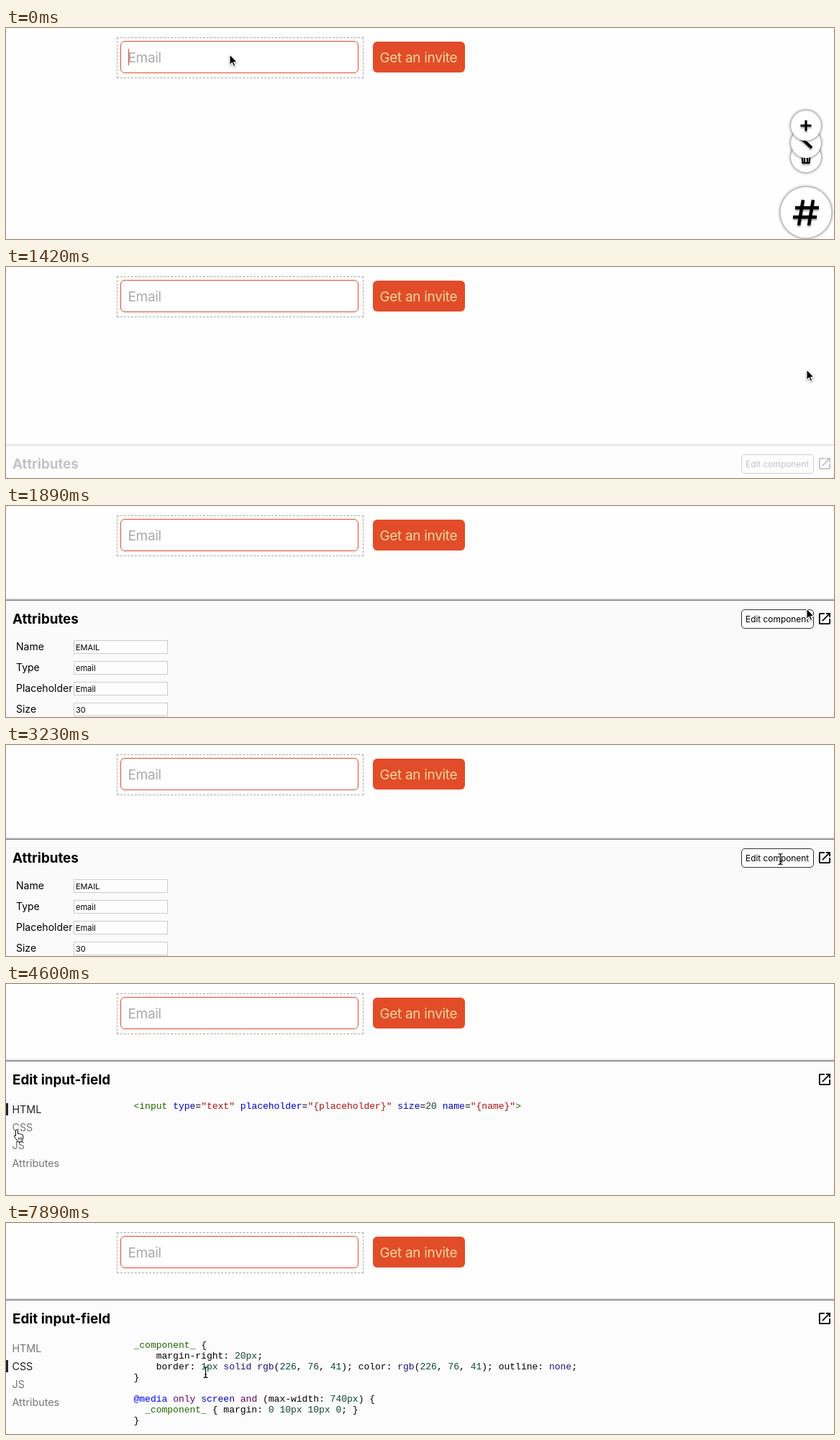
An HTML page that plays this animation: 1151 by 294 pixels, repeating every 8000 ms.

```html
<!DOCTYPE html>
<html lang="en">
<head>
<meta charset="utf-8">
<title>Component editor</title>
<style>
  html, body { margin: 0; width: 100%; height: 100%; overflow: hidden; background: #fefefe; }
  svg { display: block; }
  text { font-family: Inter, sans-serif; white-space: pre; }
  .frame { position: absolute; left: 154px; top: 13px; width: 341px; height: 55px; border: 1px dashed #aaa; }
  .big { font-size: 19px; letter-spacing: -.33px; }
  .title { font-size: 18.8px; font-weight: 700; }
  .label { font-size: 14px; }
  .value { font-size: 11px; }
  .tab { font-size: 14.3px; fill: #777; }
  .tab.on { fill: #222; }
  .code text { font: 13px "Liberation Mono", monospace; }
  .tag { fill: #260; } .attr { fill: #00c; } .str { fill: #a11; } .num { fill: #143; }
  .atom { fill: #217; } .def { fill: #00f; } .key { fill: #606; }
  .sheet { filter: drop-shadow(0 -1px 1.5px #000c); }
  .disc { fill: #fff; filter: drop-shadow(0 0 2px #444); }
  .icon { fill: none; stroke: #000; filter: drop-shadow(0 2px 1px #0006); }
</style>
</head>
<body>
<div class="frame"></div>
<svg width="1151" height="294" style="position:relative">
  <defs>
    <path id="open" transform="translate(1127.3 15.3) scale(.89)" d="M19 19H5V5h7V3H5c-1.1 0-2 .9-2 2v14c0 1.1.9 2 2 2h14c1.1 0 2-.9 2-2v-7h-2zM14 3v2h3.6l-9.8 9.8 1.4 1.4L19 6.4V10h2V3z"/>
  </defs>

  <rect x="159.5" y="18.5" width="330" height="44" rx="5.5" fill="#fff" stroke="#e24c29"/>
  <text class="big" x="169.500" y="48" fill="#aaa">Email</text>
  <path id="caret" d="M170.5 29v23" stroke="#e24c29"/>
  <rect x="510" y="19" width="128" height="43" rx="6" fill="#e24c29"/>
  <text class="big" x="519.5" y="48" fill="#f5d79c">Get an invite</text>

  <g id="menu">
    <g class="fab"><circle class="disc" r="21"/>
      <path class="icon" stroke-width="2" d="M-7-4H7M-3-6H3M-5.5-2L-4.5 8H4.5L5.5-2M-2-2V8M2-2V8"/></g>
    <g class="fab"><circle class="disc" r="21"/>
      <path class="icon" stroke-width="4" d="M-7-7L8 7"/></g>
    <g class="fab"><circle class="disc" r="21"/>
      <path class="icon" stroke-width="3" d="M-7.5 0H7.5M0-7.5V7.5"/></g>
    <g transform="translate(1112 257)"><circle class="disc" r="35.5"/>
      <path class="icon" stroke-width="4.5" d="M-15-6.500H18M-18 6.500H15M-4-17.500L-10 18M10-17.500L4 18"/></g>
  </g>

  <g id="attributes">
    <rect class="sheet" x="-10" y="1" width="1171" height="320" fill="#fafafa"/>
    <text class="title" x="9" y="33">Attributes</text>
    <rect x="1022.5" y="13.5" width="100" height="26" rx="4.5" fill="#fdfdfd" stroke="#333"/>
    <text x="1028" y="31" font-size="11.9">Edit component</text>
    <use href="#open"/>
    <g id="rows"></g>
  </g>

  <g id="editor" transform="translate(0 107)">
    <rect class="sheet" x="-10" y="1" width="1171" height="220" fill="#fcfcfc"/>
    <text class="title" x="9" y="33">Edit input-field</text>
    <use href="#open"/>
    <rect id="marker" width="3" height="17" fill="#222"/>
    <g id="tabs"></g>
    <g class="code" id="html"></g>
    <g class="code" id="css"></g>
  </g>

  <g id="cursor" stroke-linejoin="round">
    <path id="arrow" transform="scale(.88)" d="M0 0V16.500L3.800 13 6.300 18.800 9 17.600 6.500 12H11.700Z" stroke="#fff" stroke-width="1.2" style="filter:drop-shadow(0 1px 1px #0006)"/>
    <g id="beam" fill="none">
      <path stroke="#fff" stroke-width="2.5" d="M0-6V6"/>
      <path stroke="#000" stroke-width="1.2" d="M-3-7.500Q0-7.500 0-5.500V5.500Q0 7.500-3 7.500M3-7.500Q0-7.500 0-5.500V5.500Q0 7.500 3 7.500M-1.500 3H1.500"/>
    </g>
    <g id="hand" transform="translate(-4.500 0)" fill="#fff" stroke="#000">
      <path d="M3 9V2a1.500 1.500 0 0 1 3 0V6q2-1 2.800.6 2-.6 2.400.8 2-.3 2 1.600v3q0 2-1.500 3.500v2H5.500V16Q3 13 1 10q-1-2 2-1Z"/>
      <path d="M6.800 11v3.500M9 11v3.500M11 11v3.500" stroke-width=".8"/>
    </g>
  </g>
</svg>
<script>
const $ = id => document.getElementById(id);
const show = (id, on) => $(id).style.display = on ? '' : 'none';
const place = (el, x, y) => el.setAttribute('transform', `translate(${x} ${y})`);
const clamp = v => Math.max(0, Math.min(1, v));
const ease = p => p * p * (3 - 2 * p);

const rows = [['Name', 'EMAIL'], ['Type', 'email'], ['Placeholder', 'Email'], ['Size', '30']];
$('rows').innerHTML = rows.map(([label, value], i) => `<g transform="translate(0 ${29 * i})">
  <text class="label" x="14" y="70">${label}</text>
  <rect x="94.5" y="56.5" width="130" height="18" fill="#fdfdfd" stroke="#ccc"/>
  <text class="value" x="97" y="70">${value}</text></g>`).join('');

$('tabs').innerHTML = ['HTML', 'CSS', 'JS', 'Attributes']
  .map((name, i) => `<text class="tab" x="8.500" y="${73 + 25 * i}">${name}</text>`).join('');

// Code lines mark coloured words as [class|word].
const paint = line => line.replace(/</g, '&lt;').replace(/>/g, '&gt;')
  .replace(/\[(\w+)\|(.*?)\]/g, '<tspan class="$1">$2</tspan>');
const writeCode = (id, lines) => $(id).innerHTML = lines
  .map((line, i) => `<text x="177.500" y="${67 + 15 * i}">${paint(line)}</text>`).join('');

writeCode('html', [
  '[tag|<input] [attr|type]=[str|"text"] [attr|placeholder]=[str|"{placeholder}"] [attr|size]=[num|20] [attr|name]=[str|"{name}"][tag|>]'
]);
const rgb = '[atom|rgb]([num|226], [num|76], [num|41])';
writeCode('css', [
  '[tag|_component_] {',
  '    margin-right: [num|20px];',
  `    border: [num|1px] [atom|solid] ${rgb}; color: ${rgb}; outline: [atom|none];`,
  '}',
  '',
  '[def|@media] [key|only] [attr|screen] [key|and] (max-width: [num|740px]) {',
  '  [tag|_component_] { margin: [num|0] [num|10px] [num|10px] [num|0]; }',
  '}'
]);

// Pointer moves: start, end, then four Bezier points.
const moves = [
  [60, 200, [311, 37], [313, 32], [318, 33], [320, 35]],
  [380, 950, [320, 35], [700, 60], [1130, 260], [1113, 143]],
  [2400, 2600, [1113, 143], [1105, 146], [1085, 157], [1076.5, 159]],
  [3890, 4370, [1076.5, 159], [800, 175], [300, 315], [5, 206]],
  [4540, 4600, [5, 206], [8, 205], [12, 203], [15, 202.5]],
  [5650, 5710, [15, 202.5], [20, 200], [25, 198], [30, 196]],
  [7000, 7800, [30, 196], [200, 215], [600, 280], [284, 206]],
  [7830, 7890, [284, 206], [282, 207], [280, 208], [277.5, 208]]
];

function pointer(t) {
  const [start, end, ...pts] = moves.filter(m => m[0] <= t).pop() || moves[0];
  const u = ease(clamp((t - start) / (end - start))), v = 1 - u;
  const w = [v * v * v, 3 * v * v * u, 3 * v * u * u, u * u * u];
  return [0, 1].map(axis => pts.reduce((sum, p, i) => sum + p[axis] * w[i], 0));
}

function pointerKind(t, x) {
  if (t < 2560) return 'arrow';
  if (t < 3890 || x > 174) return 'beam';
  return x < 60 ? 'hand' : 'arrow';
}

const fabs = document.querySelectorAll('.fab');
const tabs = document.querySelectorAll('.tab');
const fabFrom = [180, 160, 136], fabTo = [181, 136, 90];

function draw(now) {
  const t = now % 8000;

  show('caret', t < 600 || (t >= 1130 && t < 1360));
  show('menu', t < 1360);
  const spread = ease(clamp((t - 30) / 170));
  fabs.forEach((fab, i) => place(fab, 1112, fabFrom[i] + (fabTo[i] - fabFrom[i]) * spread));

  const rise = 1 - (1 - clamp((t - 1350) / 540)) ** 1.84;
  show('attributes', t >= 1360 && t < 3290);
  $('attributes').style.opacity = rise;
  place($('attributes'), 0, Math.round(131 + 152 * (1 - rise)));

  const active = t < 6430 ? 0 : 1;
  show('editor', t >= 3290);
  show('html', !active);
  show('css', active);
  $('marker').setAttribute('y', 59 + 25 * active);
  tabs.forEach((tab, i) => tab.classList.toggle('on', i === active));

  const [x, y] = pointer(t), kind = pointerKind(t, x);
  place($('cursor'), x, y);
  for (const id of ['arrow', 'beam', 'hand']) show(id, id === kind);
}

const begin = performance.now();
(function tick() {
  draw(performance.now() - begin);
  requestAnimationFrame(tick);
})();
</script>
</body>
</html>
```
